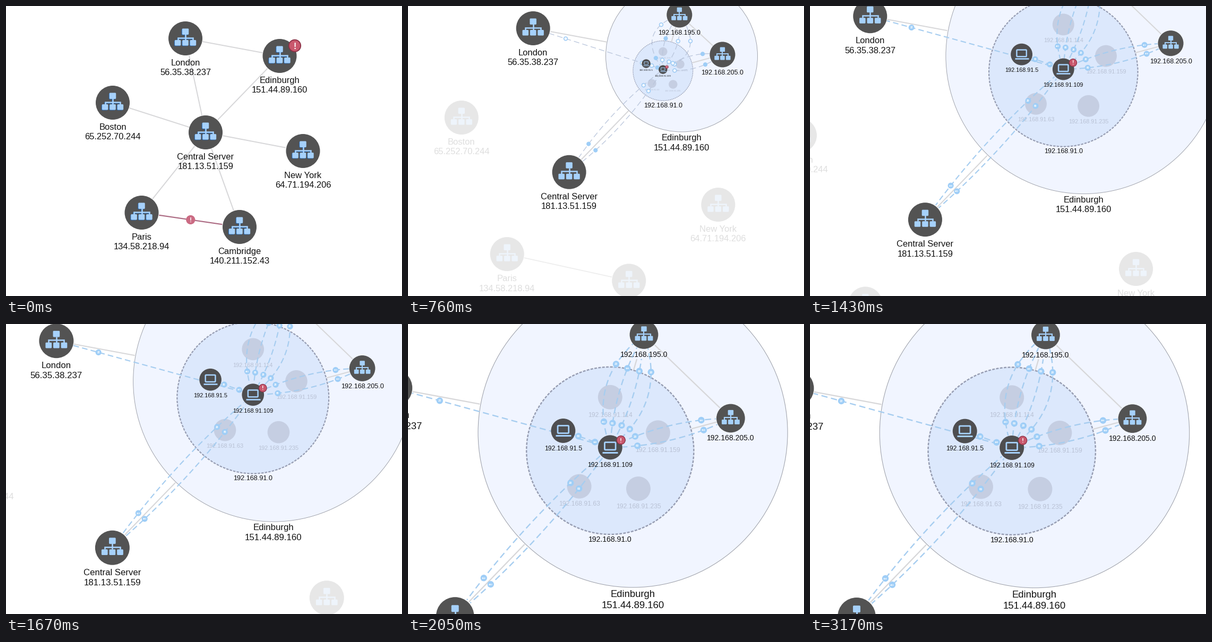
A matplotlib script that plays this animation: 746 by 546 pixels, repeating every 3.25 s.

```python
import numpy as np
import matplotlib.pyplot as plt
from matplotlib.animation import FuncAnimation
from matplotlib.colors import to_rgb
from matplotlib.lines import Line2D
from matplotlib.patches import Circle, FancyBboxPatch, PathPatch
from matplotlib.path import Path

W, H, LOOP, STEP = 746, 546, 3250, 25
PT = 0.72  # points per pixel at 100 dpi
DARK, ICON, GREY = "#535353", "#a6d1fb", "#d7d7d9"
RED, RED_EDGE, FLOW = "#c9586d", "#8a3045", "#a6cdf0"

HUB = np.array([515.5, 94.0])
SITES = {
    "London": (338, 61, "56.35.38.237"),
    "Boston": (201, 182, "65.252.70.244"),
    "Central Server": (376, 238, "181.13.51.159"),
    "New York": (559.5, 273, "64.71.194.206"),
    "Paris": (255.5, 389, "134.58.218.94"),
    "Cambridge": (440, 416, "140.211.152.43"),
}
ACTIVE = ("London", "Central Server")
KEYS = (0, 480, 1050, 1430)
SUBNETS = {
    "91.0": ((-10, -32.5, -38.2, -38.2), (8, 26, 30, 30.5)),
    "195.0": ((-4, -12, 4.5, 18.7), (-14, -44.5, -114, -164.7)),
    "205.0": ((14, 44, 113.5, 164.7), (2, 5, -11, -24)),
}
HOSTS = {
    "91.114": (0, -90), "91.159": (80.5, -30.5), "91.63": (-52, 60),
    "91.235": (47.5, 64), "91.5": (-79, -33.5), "91.109": (0, -5.5),
}
TRAFFIC = {
    "London": [("22", "20")],
    "Central Server": [("443", "80"), ("104", "20")],
    "195.0": [("22", "443"), ("100", "80"), ("80", "20"), ("20", "20")],
    "205.0": [("100", "20"), ("104", "80")],
    "91.5": [("80", "100")],
}

fig = plt.figure(figsize=(W / 100, H / 100), dpi=100, facecolor="white")
ax = fig.add_axes([0, 0, 1, 1])
ax.axis("off")
drawn = []
zoom = 1.0


def mix(a, b, k):
    return tuple((1 - k) * np.array(to_rgb(a)) + k * np.array(to_rgb(b)))


def ramp(t, a, b):
    return float(np.clip((t - a) / (b - a), 0, 1))


def ease(u):
    return 4 * u**3 if u < 0.5 else 1 - 4 * (1 - u) ** 3


def round_box(x, y, w, h, rnd):
    style = f"round,pad=0,rounding_size={rnd}"
    return FancyBboxPatch((x - w / 2, y - h / 2), w, h, boxstyle=style).get_path()


# unit-radius icon shapes
TREE = Path.make_compound_path(
    round_box(0, -0.4, 0.39, 0.36, 0.05),
    *[round_box(x, 0.26, 0.36, 0.33, 0.05) for x in (-0.45, 0, 0.45)])
BRANCHES = Path([(0, -0.25), (0, 0.1), (-0.45, 0.1), (-0.45, -0.04),
                 (0.45, -0.04), (0.45, 0.1)], [1, 2, 1, 2, 2, 2])
SCREEN = round_box(0, -0.11, 0.9, 0.62, 0.06)
BASE = Path([(-0.64, 0.41), (0.64, 0.41)])


def add(artist):
    artist.set_zorder(len(drawn) + 1)
    ax.add_artist(artist)
    drawn.append(artist)


def disc(p, r, fill, edge="none", lw=0, alpha=1, ls="-"):
    add(Circle(p, r, facecolor=fill, edgecolor=edge, lw=lw * zoom * PT,
               alpha=alpha, linestyle=ls))


def line(x, y, color, lw, alpha=1, ls="-"):
    add(Line2D(x, y, color=color, lw=lw * zoom * PT, alpha=alpha, ls=ls,
               solid_capstyle="butt", dash_capstyle="butt"))


def label(x, y, s, px, color="#111111", alpha=1, weight="normal"):
    if alpha <= 0 or px < 1:
        return
    txt = ax.text(x, y + 0.36 * px, s, fontsize=px * zoom * PT, color=color,
                  alpha=alpha, ha="center", va="baseline", weight=weight,
                  family="Liberation Sans", clip_on=True)
    txt.set_zorder(len(drawn) + 1)
    drawn.append(txt)


def shape(path, p, r, color, alpha, stroke=0):
    """Unit path at p, scaled by r: filled, or stroked if a width is given."""
    placed = Path(path.vertices * r + p, path.codes)
    add(PathPatch(placed, facecolor="none" if stroke else color,
                  edgecolor=color if stroke else "none",
                  lw=stroke * r * zoom * PT, alpha=alpha, capstyle="butt"))


def tree_icon(p, r, color, alpha=1):
    shape(TREE, p, r, color, alpha)
    shape(BRANCHES, p, r, color, alpha, 0.08)


def laptop_icon(p, r, alpha):
    shape(SCREEN, p, r, ICON, alpha, 0.12)
    shape(BASE, p, r, ICON, alpha, 0.13)


def alert(p, r, alpha=1):
    """Warning badge at the upper right of a node of radius r."""
    if alpha <= 0:
        return
    x, y = p[0] + 0.89 * r, p[1] - 0.6 * r
    disc((x, y), 0.35 * r, RED, RED_EDGE, 0.055 * r, alpha)
    label(x, y, "!", 0.5 * r, "white", alpha, "bold")


def node(p, r, half, tail):
    return {"p": np.array(p, float), "r": r, "half": half, "tail": tail}


def visible(pts, *ends):
    """Keep the points outside each end's circle and caption."""
    keep = np.ones(len(pts), bool)
    for n in ends:
        dx, dy = (pts - n["p"]).T
        caption = (abs(dx) < n["half"]) & (dy > n["r"]) & (dy < n["r"] + n["tail"])
        keep &= (np.hypot(dx, dy) > n["r"] + 0.5) & ~caption
    return pts[keep]


def curve(a, b, bend=0):
    u = np.linspace(0, 1, 300)[:, None]
    v = b["p"] - a["p"]
    n = np.array([v[1], -v[0]]) / max(np.hypot(*v), 1e-6)
    pts = a["p"] + u * v + 2 * u * (1 - u) * bend * n
    return visible(pts, a, b)


def link(a, b, color=GREY, alpha=1, lw=2):
    pts = curve(a, b)
    if alpha > 0 and len(pts) > 1:
        line(*pts.T, color, lw, alpha)


def flows(a, b, tags, t, thin, alpha):
    spots = []
    lw = 2.1 - 0.8 * thin
    for i, pair in enumerate(tags):
        pts = curve(a, b, 48 * (i - (len(tags) - 1) / 2))
        if len(pts) < 8:
            continue
        dash = (-0.02 * t / lw, (10.5 / lw, 6 / lw))
        line(*pts.T, mix(FLOW, "#bac6dc", thin), lw, alpha, dash)
        for frac, tag in zip((0.15, 0.85), pair):
            spots.append((pts[int(frac * len(pts))], tag))
    return spots


def flow_badge(p, tag, thin, alpha):
    hollow = thin > 0.5 and len(tag) < 3
    if hollow:
        disc(p, 3.4, "#f4f9ff", "#9dcbf5", 1.5, alpha)
    else:
        disc(p, 5.5 - 1.4 * thin, "#9fcef7", alpha=alpha)
        if thin < 0.5:
            label(*p, tag, 5 if len(tag) < 3 else 4, "white", alpha, "bold")


def camera(t):
    global zoom
    k = ease(ramp(t, 1430, 2130))
    zoom = 1 + 0.12 * k
    left, top = HUB - (HUB + np.array([-92.5, 111]) * k) / zoom
    ax.set_xlim(left, left + W / zoom)
    ax.set_ylim(top + H / zoom, top)


def draw(i):
    t = i * STEP
    while drawn:
        drawn.pop().remove()
    camera(t)

    opened = ramp(t, 0, 200)
    dim = 1 - 0.86 * ramp(t, 0, 330)
    sub_in = ramp(t, 100, 330)
    net_in = ramp(t, 490, 620)
    flow_in = ramp(t, 180, 400)
    thin = np.interp(t, (500, 640, 1090, 1250), (0, 1, 1, 0))
    push = np.interp(t, (0, 100, 480, 570, 1050, 1430),
                     (0, 5, 55.5, 69, 162.5, 229.5))
    big = np.interp(t, KEYS, (32, 97, 194, 260.5))
    size = np.interp(t, (0, 480, 700), (0.3, 0.85, 1))
    net = np.interp(t, (480, 560, 1050, 1430), (20.4, 30, 98, 140.8))
    k = net / 140.8

    sites = {}
    for name, (x, y, _) in SITES.items():
        v = np.array([x, y]) - HUB
        sites[name] = node(HUB + v * (1 + push / np.hypot(*v)), 32, 58, 41)
    hub = node(HUB, big, 58, 41)
    subs = {}
    for name, (xs, ys) in SUBNETS.items():
        off = np.array([np.interp(t, KEYS, xs), np.interp(t, KEYS, ys)])
        subs[name] = node(HUB + off, 24 * size, 45 * size, 16.6 * size)
    core = subs["91.0"]
    if t > 480:
        core["r"] = net
    hosts = {n: node(core["p"] + k * np.array(o), 20.5 * k, 40 * k, 15 * k)
             for n, o in HOSTS.items()}

    # links between sites
    centre, london = sites["Central Server"], sites["London"]
    for name in ("London", "Boston", "New York", "Paris", "Cambridge"):
        link(sites[name], centre, alpha=1 - opened)
    pa, ca = sites["Paris"], sites["Cambridge"]
    link(pa, ca, mix("#ad6c84", "#ededed", opened), lw=2.2 - 0.5 * opened)
    if opened < 1:
        mid = (pa["p"] + ca["p"]) / 2
        disc(mid, 8.6, "#cb6b83", alpha=1 - opened)
        label(*mid, "!", 12, "white", 1 - opened, "bold")

    # hub area and its contents
    if opened > 0:
        disc(HUB, big, "#f1f5ff", "#9a9da6", 0.9, opened)
    link(london, hub)
    link(centre, hub)
    if sub_in > 0:
        link(subs["195.0"], subs["205.0"], alpha=sub_in)
        if net_in > 0:
            edge = 2.2 * min(1, k + 0.1)
            disc(core["p"], net, "#dce8fc", "#979db2", edge, net_in,
                 (0, (2, 1)))
        for name in ("195.0", "205.0"):
            link(subs[name], core, alpha=sub_in)

    if net_in > 0:
        for name in ("91.114", "91.159", "91.63", "91.235"):
            n = hosts[name]
            disc(n["p"], n["r"], "#c5cee2", alpha=net_in)
            label(n["p"][0], n["p"][1] + 29 * k, "192.168." + name, 10.8 * k,
                  "#b9c2d5", net_in)

    target = hosts["91.109"] if net_in > 0.5 else core
    if flow_in > 0:
        ends = {**sites, **subs, **hosts}
        spots = []
        for name, tags in TRAFFIC.items():
            if name in hosts and net_in < 0.5:
                continue
            spots += flows(ends[name], target, tags, t, thin, flow_in)
        for p, tag in spots:
            flow_badge(p, tag, thin, flow_in)

    # nodes on top
    for name, n in sites.items():
        on = name in ACTIVE
        a = 1 if on else dim
        x, y = n["p"]
        disc(n["p"], 32, mix("white", DARK, a))
        if t < 150:
            tree_icon((x - 1, y + 0.8), 32, "#2263ad", 1 - t / 150)
        tree_icon(n["p"], 32, mix("#eef4fb", ICON, ramp(a, 0.14, 1)))
        color = mix("white", "#111111", a)
        label(x, y + 45, name, 16.5, color)
        label(x, y + 63.5, SITES[name][2], 16.5, color)

    if opened < 1:
        a = 1 - opened
        disc(HUB, 32, DARK, alpha=a)
        tree_icon(HUB + (-1, 0.8), 32, "#2263ad", a)
        tree_icon(HUB, 32, ICON, a)
        alert(HUB, 32, a)
    cap = HUB[1] + big + 12.7 - 2.7 * opened
    label(HUB[0], cap, "Edinburgh", 16.5)
    label(HUB[0], cap + 18.7, "151.44.89.160", 16.5)

    if sub_in > 0:
        for name, n in subs.items():
            a = sub_in * (1 - net_in) if n is core else sub_in
            x, y = n["p"]
            if a > 0:
                r = 24 * size
                disc(n["p"], r, DARK, alpha=a)
                tree_icon(n["p"], r, ICON, a)
            drop = n["r"] + 8 if n is core else 33 * size
            label(x, y + drop, "192.168." + name, 12.5 * size, alpha=sub_in)
    if net_in > 0:
        for name in ("91.5", "91.109"):
            n = hosts[name]
            disc(n["p"], n["r"], "#4e4e50", alpha=net_in)
            laptop_icon(n["p"], n["r"], net_in)
            label(n["p"][0], n["p"][1] + 29 * k, "192.168." + name, 10.8 * k,
                  alpha=net_in)
    alert(core["p"], 24 * size, sub_in * (1 - net_in))
    alert(hosts["91.109"]["p"], 20.5 * k, net_in)
    return drawn


anim = FuncAnimation(fig, draw, frames=LOOP // STEP, interval=STEP,
                     init_func=lambda: [], repeat=True, repeat_delay=0,
                     blit=False)
plt.show()
```
